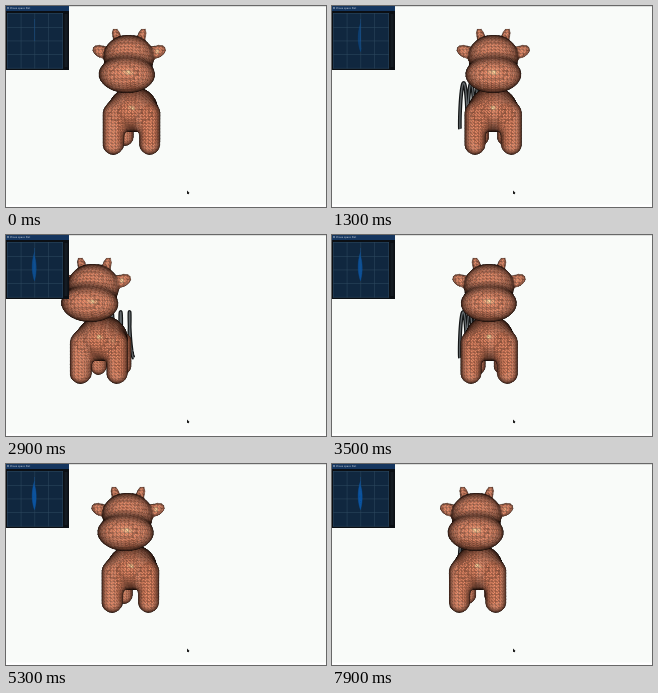
Recreate the animation shown at these times as an HTML page with a canvas. Size 320 by 201 pixels, loop 8000 ms.

```html
<!DOCTYPE html>
<html lang="en">
<head>
<meta charset="utf-8">
<title>Spring oscillator</title>
<style>
  html, body { margin: 0; width: 100%; height: 100%; overflow: hidden; background: #f9fbf9; }
  canvas { display: block; width: 320px; height: 201px; }
</style>
</head>
<body>
<canvas id="stage"></canvas>
<script>
const W = 320, H = 201, LOOP = 8000, STEP = 100;
const canvas = document.getElementById('stage');
const ratio = window.devicePixelRatio || 1;
canvas.width = W * ratio;
canvas.height = H * ratio;
const ctx = canvas.getContext('2d');
ctx.scale(ratio, ratio);

// Damped oscillator
const REST = 123, AMP = 72, DECAY = 0.15, PERIOD = 2.125;
const OMEGA = 2 * Math.PI / PERIOD;
const swing = t => Math.exp(-DECAY * t) * Math.sin(OMEGA * t);
const speed = t => Math.exp(-DECAY * t) * Math.cos(OMEGA * t);

// Perspective camera; z grows away from the viewer
const EYE = { x: 160, y: 97.5, dist: 300 };
function project(p, cx) {
  const s = EYE.dist / (EYE.dist + p[2]);
  return [EYE.x + (cx + p[0] - EYE.x) * s, EYE.y + (p[1] - EYE.y) * s];
}

// Signed distance to an ellipsoid, tilted in the xy plane and stretched along y
function blob(at, size, { tilt = 0, stretch = 0, blend = 4 } = {}) {
  const cos = Math.cos(tilt), sin = Math.sin(tilt);
  const dist = (px, py, pz) => {
    const dx = px - at[0], dy = py - at[1];
    const x = (dx * cos + dy * sin) / size[0];
    const long = dy * cos - dx * sin;
    const y = (long - Math.max(-stretch, Math.min(stretch, long))) / size[1];
    const z = (pz - at[2]) / size[2];
    const k0 = Math.hypot(x, y, z);
    const k1 = Math.hypot(x / size[0], y / size[1], z / size[2]);
    return k1 ? k0 * (k0 - 1) / k1 : -Math.min(...size);
  };
  return { dist, blend };
}

// One half of the cow; the other half is its mirror image
const cow = [
  blob([0, 104, 42], [27, 25, 38]),                                    // body
  blob([19.5, 125, 23], [10.8, 11, 12], { stretch: 16, blend: 9 }),    // front leg
  blob([16, 125, 92], [10, 11, 11], { stretch: 16, blend: 9 }),        // rear leg
  blob([0, 51, 0], [24.5, 20, 20], { stretch: 1, blend: 2 }),          // skull
  blob([0, 70, -15], [26, 17, 22], { blend: 9 }),                      // muzzle
  blob([27.5, 45.5, 2], [9.5, 5.8, 4.5], { tilt: -0.42, blend: 3 }),   // ear
  blob([12.7, 29.5, 2], [3.8, 8, 4], { tilt: 0.28, blend: 3 })         // horn
];

function field([x, y, z]) {
  let d = 1e3;
  for (const part of cow) {
    const e = part.dist(Math.abs(x), y, z);
    const h = Math.max(0, part.blend - Math.abs(d - e));
    d = Math.min(d, e) - h * h / part.blend / 4;
  }
  return d;
}

function gradient(p) {
  const g = [0, 1, 2].map(k => {
    const a = [...p], b = [...p];
    a[k] += 0.05;
    b[k] -= 0.05;
    return field(a) - field(b);
  });
  const len = Math.hypot(...g) || 1;
  return g.map(v => v / len);
}

// Wrap the surface in a triangle mesh, one vertex for each crossed cell
function buildMesh(cell) {
  const low = [-42, 18, -42], high = [42, 157, 110], faces = [], cache = new Map();
  const corner = g => g.map((v, k) => low[k] + v * cell);
  const vertex = g => {
    const key = g.join();
    if (!cache.has(key)) {
      let p = corner(g.map(v => v + 0.5));
      for (let i = 0; i < 4; i++) {
        const d = field(p), n = gradient(p);
        p = p.map((v, k) => v - d * n[k]);
      }
      cache.set(key, { p, n: gradient(p) });
    }
    return cache.get(key);
  };
  const addFace = (...v) => {
    const mean = prop => [0, 1, 2].map(k => v.reduce((sum, q) => sum + q[prop][k] / 3, 0));
    faces.push({ pts: v.map(q => q.p), mid: mean('p'), normal: mean('n') });
  };
  const count = high.map((v, k) => Math.ceil((v - low[k]) / cell));
  for (let i = 1; i < count[0]; i++)
    for (let j = 1; j < count[1]; j++)
      for (let k = 1; k < count[2]; k++) {
        const g = [i, j, k], here = field(corner(g));
        if (Math.abs(here) > cell * 2.5) continue;
        for (let axis = 0; axis < 3; axis++) {
          const next = [...g];
          next[axis]++;
          if (here < 0 === field(corner(next)) < 0) continue;
          const around = (u, v) => {
            const c = [...g];
            c[(axis + 1) % 3] -= u;
            c[(axis + 2) % 3] -= v;
            return vertex(c);
          };
          const a = around(0, 0), b = around(1, 0), c = around(1, 1), d = around(0, 1);
          addFace(a, b, c);
          addFace(a, c, d);
        }
      }
  return faces.sort((p, q) => q.mid[2] - p.mid[2]);
}
const mesh = buildMesh(3.5);

function facing(normal, mid, cx, eyeY) {
  const view = [EYE.x - cx - mid[0], eyeY - mid[1], -EYE.dist - mid[2]];
  return normal.reduce((sum, n, k) => sum + n * view[k], 0) / Math.hypot(...view) / Math.hypot(...normal);
}

function drawCow(cx) {
  ctx.lineWidth = 0.4;
  ctx.lineJoin = 'round';
  for (const { pts, mid, normal } of mesh) {
    const face = facing(normal, mid, cx, EYE.y);
    if (face < -0.05) continue;
    const light = Math.min(1, 0.1 + 1.02 * Math.pow(Math.max(0, face), 0.7));
    const shine = 75 * Math.pow(Math.max(0, facing(normal, mid, cx, 66)), 130);
    const color = [240, 143, 107].map((v, k) => v * light + shine * [0.2, 1, 0.7][k]);
    ctx.beginPath();
    for (const p of pts) ctx.lineTo(...project(p, cx));
    ctx.closePath();
    ctx.fillStyle = `rgb(${color.map(Math.round)})`;
    ctx.fill();
    ctx.strokeStyle = `rgb(${color.map(v => Math.round(v * 0.48))})`;
    ctx.stroke();
  }
}

function drawSpring(cx) {
  const anchor = 128, turns = 4.5, radius = 23;
  ctx.beginPath();
  for (let i = 0; i <= 200; i++) {
    const u = i / 200, a = u * turns * 2 * Math.PI;
    const x = anchor + (cx - anchor) * u;
    ctx.lineTo(x - (EYE.x - x) * 0.05 * Math.sin(a), 100 + radius * Math.cos(a));
  }
  for (const [color, width] of [['#141617', 3.8], ['#63686b', 1.3]]) {
    ctx.strokeStyle = color;
    ctx.lineWidth = width;
    ctx.stroke();
  }
}

function box(color, x, y, w, h) {
  ctx.fillStyle = color;
  ctx.fillRect(x, y, w, h);
}

function drawPlot(t) {
  box('#0b0f14', 0, 0, 63, 64);
  box('#15365f', 0, 0, 63, 5);
  ctx.fillStyle = '#d5dde6';
  ctx.beginPath();
  ctx.moveTo(1, 1.6);
  ctx.lineTo(3, 1.6);
  ctx.lineTo(2, 3.3);
  ctx.fill();
  ctx.font = '2.4px "DejaVu Sans", sans-serif';
  ctx.textBaseline = 'middle';
  ctx.fillText('Phase space Plot', 4, 2.6);
  box('#10273f', 1, 7, 56, 55.5);
  for (let k = 0; k < 5; k++) {
    box('#2f4a60', 1 + k * 13.8, 7, 0.5, 55.5);
    box('#2f4a60', 1, 7.5 + k * 13.6, 56, 0.5);
  }
  box('#141b22', 58.5, 8, 3, 53);

  // Squared displacement gives the trace its pointed ends
  ctx.beginPath();
  for (let q = 0; q <= t + 1e-6; q += 0.02) {
    const x = swing(q);
    ctx.lineTo(28.5 - 2.7 * x * Math.abs(x), 32.5 - 15.5 * speed(q));
  }
  ctx.globalAlpha = Math.min(0.9, 0.3 + 0.14 * t);
  ctx.fillStyle = ctx.strokeStyle = '#0d58a6';
  ctx.lineWidth = 0.5;
  ctx.fill();
  ctx.stroke();
  ctx.globalAlpha = 1;
  box('rgba(24,82,145,0.45)', 28, 13, 1, 22);
}

function drawCursor() {
  ctx.beginPath();
  ctx.moveTo(181, 184.4);
  ctx.lineTo(181, 187.8);
  ctx.lineTo(182.6, 188.2);
  ctx.lineTo(183.4, 186.8);
  ctx.closePath();
  ctx.fillStyle = '#151515';
  ctx.fill();
}

function draw(ms) {
  const t = ms / 1000;
  const cx = REST - AMP * swing(t);
  box('#f9fbf9', 0, 0, W, H);
  box('#dcdedc', 0, 0, W, 1);
  box('#ffffff', 0, 198.5, W, 2.5);
  drawSpring(cx);
  drawCow(cx);
  drawPlot(t);
  drawCursor();
}

const start = performance.now();
let shown = -1;
function tick() {
  const ms = Math.floor((performance.now() - start) % LOOP / STEP) * STEP;
  if (ms !== shown) draw(shown = ms);
  requestAnimationFrame(tick);
}
tick();
</script>
</body>
</html>
```
